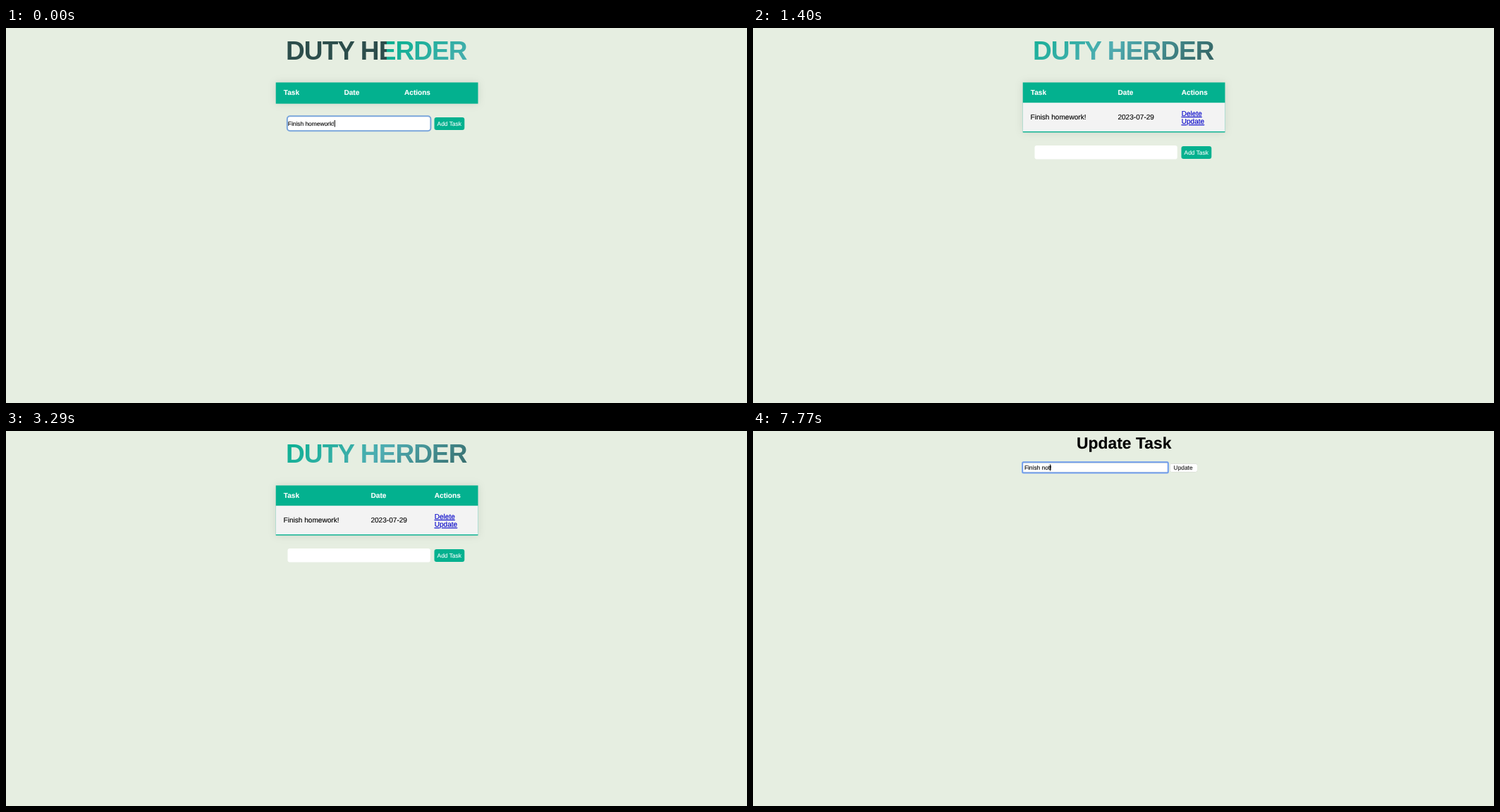
Write an HTML page that moves like this. It is 1051 by 533 pixels and loops after 8 s.

```html
<!DOCTYPE html>
<html lang="en">
<head>
<meta charset="utf-8">
<title>Task list</title>
<style>
  html, body { margin: 0; width: 100%; height: 100%; overflow: hidden; background: #e6eee1; }
  body { position: relative; font-family: "Liberation Sans", Arial, Helvetica, sans-serif; }
  svg { position: absolute; left: 0; top: 0; font-size: 10.08px; text-rendering: geometricPrecision; }
  text { white-space: pre; stroke: #000; stroke-width: .12px; }
  #title {
    position: absolute; left: 397px; top: 12px; width: 257px; height: 42px; margin: 0;
    font-size: 37px; font-weight: 700; line-height: 42px; letter-spacing: -.9px; white-space: nowrap;
    color: transparent;
    background: linear-gradient(135deg, #03b18f 0%, #4fadb2 29%, #2c4d4b 67%, #2c4d4b 100%) 0 0 / 514px 42px;
    -webkit-background-clip: text; background-clip: text;
  }
  .green { fill: #03b18f; }
  .white { fill: #fff; stroke: #fff; }
  .head { font-weight: 700; }
  .small { font-size: 8.4px; }
  .link { fill: #0000c8; stroke: #0000c8; text-decoration: underline; }
  .shadow { filter: drop-shadow(0 0 6px rgba(0, 0, 0, .1)); }
  .soft { filter: drop-shadow(0 .5px .4px rgba(0, 0, 0, .35)); }
  .ring { fill: none; stroke-width: 2; }
</style>
</head>
<body>
<h1 id="title">DUTY HERDER</h1>
<svg width="1051" height="533" viewBox="0 0 1051 533">
  <g id="empty">
    <rect class="green shadow" x="382.7" y="77.4" width="286.8" height="30.2"/>
    <g class="head">
      <text class="white" x="393.8" y="95.4">Task</text>
      <text class="white" x="479.4" y="95.4">Date</text>
      <text class="white" x="565" y="95.4">Actions</text>
    </g>
  </g>
  <g id="filled">
    <rect class="green shadow" x="382.7" y="77.4" width="286.8" height="71"/>
    <rect x="382.7" y="106.2" width="286.8" height="40.8" fill="#f3f3f3"/>
    <g class="head">
      <text class="white" x="393.8" y="95.4">Task</text>
      <text class="white" x="517.5" y="95.4">Date</text>
      <text class="white" x="607.8" y="95.4">Actions</text>
    </g>
    <text x="393.5" y="130.4">Finish homework!</text>
    <text x="517.4" y="130.4">2023-07-29</text>
    <text class="link" x="607.7" y="125">Delete</text>
    <text class="link" x="607.7" y="136.3">Update</text>
  </g>
  <g id="form" class="small">
    <rect x="399.5" y="126" width="202.3" height="19.6" rx="3" fill="#fff"/>
    <rect id="formRing" class="ring" x="398.8" y="125.2" width="203.6" height="21" rx="4" stroke="#7ba6dc"/>
    <text id="draft" x="399.8" y="139">Finish homework!</text>
    <rect id="formCaret" x="465.8" y="131" width="1" height="9.6"/>
    <rect class="green" x="607.5" y="126.9" width="42.8" height="18" rx="3.2"/>
    <text class="white" x="611.6" y="139">Add Task</text>
  </g>
  <g id="edit">
    <text x="459" y="25" font-size="22.9" font-weight="700">Update Task</text>
    <g class="small">
      <rect class="soft" x="383" y="45.6" width="205" height="12.8" fill="#fff"/>
      <rect id="editRing" class="ring" x="382.2" y="44.2" width="206.6" height="15.2" rx="1.5" stroke="#6f9ced"/>
      <rect id="selection" x="409.2" y="47" width="40" height="10" fill="#b3d7ff"/>
      <text id="value" x="384.9" y="55.2"></text>
      <rect id="editCaret" y="47.3" width=".9" height="9.4"/>
      <rect class="soft" x="591.6" y="46.6" width="38.4" height="11.6" rx="2.6" fill="#fff"/>
      <text x="596.6" y="55.2" fill="#222">Update</text>
    </g>
  </g>
</svg>
<script>
  const LOOP = 8000, STEP = 70;
  const RELOAD = 1260, EDIT = 3850, FOCUS = 5460, SELECT = 5670;
  const TILE = 514, SWEEP = 2000;     // the title gradient passes one tile per sweep
  const FIRST_PHASE = 1444;           // sweep time already elapsed on the first page
  const typed = [[7770, "not"], [7630, "no"], [7560, "n"]];

  const $ = id => document.getElementById(id);
  const show = (id, on) => { $(id).style.display = on ? "" : "none"; };

  function draw(t) {
    const saved = t >= RELOAD, editing = t >= EDIT;
    const focused = t < 980;
    const entry = typed.find(([at]) => t >= at);

    show("title", !editing);
    show("empty", !saved);
    show("filled", saved && !editing);
    show("form", !editing);
    show("edit", editing);

    const sweep = saved ? t - RELOAD : t + FIRST_PHASE;
    $("title").style.backgroundPosition = `${-(sweep % SWEEP) / SWEEP * TILE}px 0`;

    $("form").setAttribute("transform", `translate(0 ${saved ? 41 : 0})`);
    show("draft", !saved);
    show("formRing", focused);
    show("formCaret", focused && (t < 420 || t >= 910));

    show("editRing", t >= FOCUS);
    show("selection", t >= SELECT && !entry);
    show("editCaret", !!entry);
    if (!editing) return;
    $("value").textContent = `Finish ${entry ? entry[1] : "homework"}!`;
    if (entry) {
      const end = $("value").getSubStringLength(0, 7 + entry[1].length);
      $("editCaret").setAttribute("x", 384.7 + end);
    }
  }

  const start = performance.now();
  function tick() {
    const t = (performance.now() - start) % LOOP;
    draw(Math.floor(t / STEP) * STEP);
    requestAnimationFrame(tick);
  }
  tick();
</script>
</body>
</html>
```
